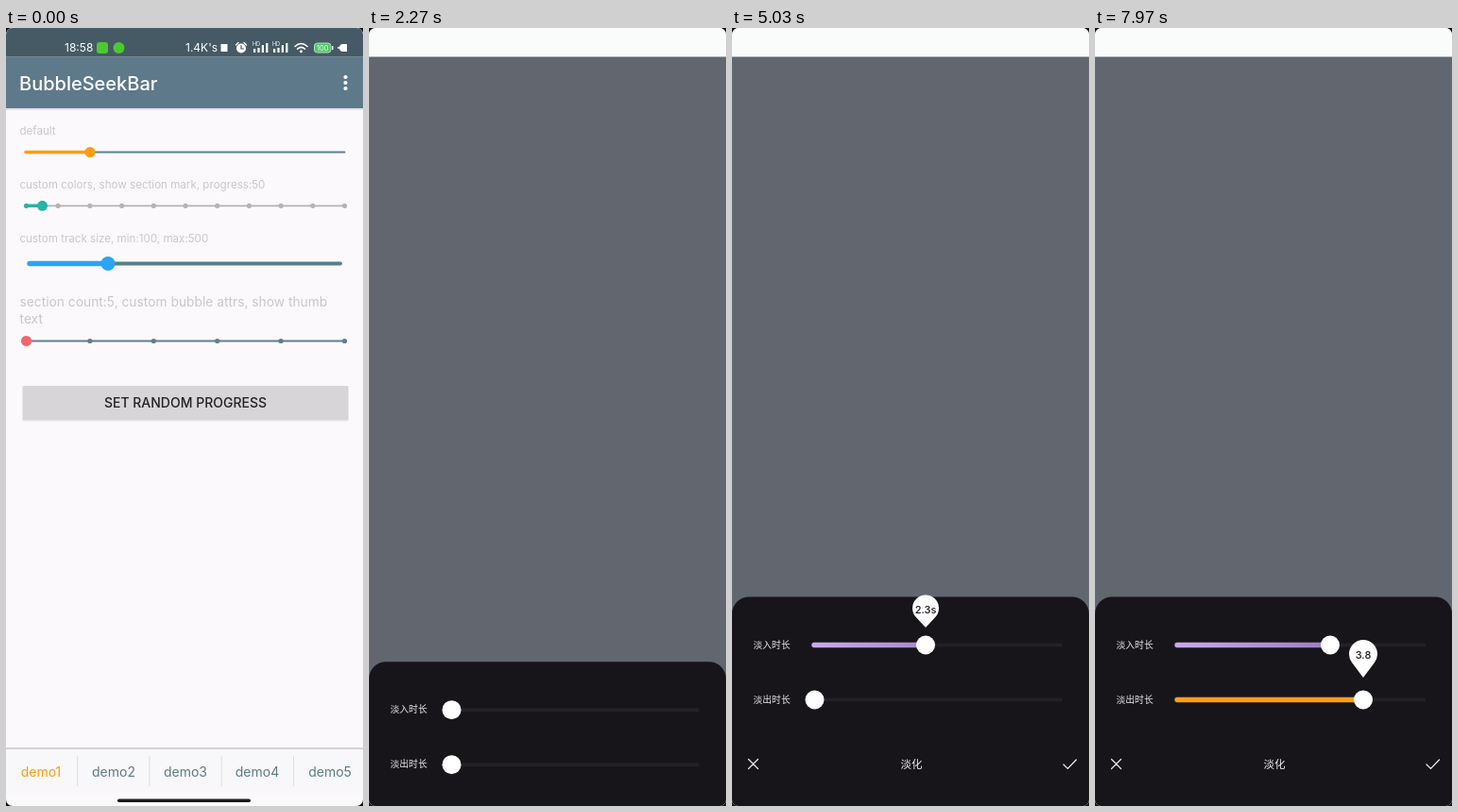
Write an HTML page that moves like this. It is 378 px wide and 824 px high and loops after 8 s.

```html
<!DOCTYPE html>
<html lang="en">
<head>
<meta charset="utf-8">
<title>Seek bar demo</title>
<style>
  html, body { margin: 0; width: 100%; height: 100%; overflow: hidden; background: #111; }
  svg { display: block; width: 100vw; height: 100vh; font-family: Inter, "Noto Sans CJK SC", "Noto Sans CJK", sans-serif; }
  .mid { text-anchor: middle; }
  .note { fill: #c9c7cb; font-size: 11.6px; }
  .line { fill: none; stroke-linecap: round; }
</style>
</head>
<body>
<svg viewBox="0 0 378 824">
  <defs>
    <clipPath id="screen"><rect width="378" height="824" rx="7"/></clipPath>
    <linearGradient id="purple" gradientUnits="userSpaceOnUse" x1="85" x2="250" y1="0" y2="0">
      <stop stop-color="#c9a9f2"/><stop offset="1" stop-color="#9a7dc4"/>
    </linearGradient>
  </defs>
  <g clip-path="url(#screen)">
    <rect width="378" height="824" fill="#fbf9fc"/>

    <g id="page">
      <rect y="85" width="378" height="2" fill="#e4e2e6"/>
      <rect y="30" width="378" height="55" fill="#5d798a"/>
      <text x="14" y="65.5" font-size="20" font-weight="500" fill="#fff">BubbleSeekBar</text>
      <g fill="#fff"><circle cx="359.5" cy="52" r="2.1"/><circle cx="359.5" cy="58" r="2.1"/><circle cx="359.5" cy="64" r="2.1"/></g>
      <g class="note">
        <text x="14.5" y="113">default</text>
        <text x="14.5" y="170">custom colors, show section mark, progress:50</text>
        <text x="14.5" y="227">custom track size, min:100, max:500</text>
        <g font-size="13.8"><text x="14.5" y="294.5">section count:5, custom bubble attrs, show thumb</text><text x="14.5" y="313">text</text></g>
      </g>
      <g id="bars"></g>
      <rect x="17" y="379" width="346" height="37.5" rx="2" fill="#e6e4e7"/>
      <rect x="18" y="379" width="344" height="36" rx="1.5" fill="#d7d5d8"/>
      <text class="mid" x="190" y="402" font-size="14" font-weight="500" fill="#222">SET RANDOM PROGRESS</text>
    </g>

    <g id="tabs">
      <rect y="762" width="378" height="48" fill="#f8f7fa"/>
      <rect y="762" width="378" height="2" fill="#d4d3d6"/>
      <circle id="ripple" cx="37" cy="788" fill="#ff9800"/>
    </g>
    <rect id="pill" x="118" y="816.5" width="141" height="3.5" rx="1.75" fill="#1b1a1c"/>

    <rect id="veil" y="30" width="378" height="794" fill="#62666f"/>

    <rect width="378" height="30.5" fill="#fafcfb"/>
    <g id="status" fill="#fff">
      <rect width="378" height="30.5" fill="#455a65"/>
      <g font-size="12"><text x="62" y="25">18:58</text><text x="190" y="25">1.4K's</text></g>
      <rect x="96" y="15" width="12" height="12" rx="3" fill="#4cc930"/>
      <circle cx="119.500" cy="21" r="6" fill="#4cc930"/>
      <rect x="227.500" y="17" width="7" height="8"/>
      <circle cx="249" cy="21.5" r="5"/>
      <path class="line" d="M249 18.500V22H251.500" stroke="#455a65" stroke-width="1.2"/>
      <path class="line" d="M243.500 18L246 15.500M252 15.500L254.500 18" stroke="#fff" stroke-width="1.3"/>
      <g id="signals"></g>
      <path class="line" d="M306 19.500Q312.500 13.500 319 19.500M308.500 22.300Q312.500 18.500 316.500 22.300" stroke="#fff" stroke-width="1.5"/>
      <circle cx="312.500" cy="24.700" r="1.500"/>
      <rect x="326.500" y="16" width="17.500" height="10" rx="3" fill="#4cc964" stroke="#b8d9c0"/>
      <rect x="345" y="19" width="1.500" height="4"/>
      <text class="mid" x="335.300" y="24" font-size="7.500">100</text>
      <path d="M361 17V25H357Q353 25 353 21T357 17ZM351 20.300H354V21.700H351Z"/>
    </g>

    <g id="sheet">
      <rect y="602.5" width="378" height="260" rx="18" fill="#17151a"/>
      <g fill="#e9e8ea" font-size="9.8"><text x="22.5" y="656.5">淡入时长</text><text x="22.5" y="714.5">淡出时长</text></g>
      <text class="mid" x="190" y="784" font-size="11.5" fill="#eee">淡化</text>
      <path class="line" d="M17.500 774.500L27.500 784.500M27.500 774.500L17.500 784.500M351 780L355.500 784.500L364.500 775" stroke="#eee" stroke-width="1.2"/>
    </g>
  </g>
</svg>
<script>
const $ = id => document.getElementById(id);
const LOOP = 8000, LAUNCH = 1950;

function add(parent, tag, attrs, text) {
  const el = document.createElementNS('http://www.w3.org/2000/svg', tag);
  set(el, attrs);
  if (text) el.textContent = text;
  return parent.appendChild(el);
}
function set(el, attrs) {
  for (const k in attrs) el.setAttribute(k, attrs[k]);
}
const line = (parent, x1, x2, y, stroke, width) =>
  add(parent, 'path', { class: 'line', d: `M${x1} ${y}H${x2}`, stroke, 'stroke-width': width });
const dot = (parent, cx, cy, r, fill) => add(parent, 'circle', { cx, cy, r, fill });

// Static seek bars of the first page
function bar(y, x1, x2, thumb, track, color, width, r, sections = 0) {
  const g = $('bars');
  line(g, x1, x2, y, track, width);
  for (let i = 0; i <= sections && sections; i++) {
    const x = x1 + (x2 - x1) * i / sections;
    dot(g, x, y, 2.6, x <= thumb ? color : track);
  }
  if (thumb > x1) line(g, x1, thumb, y, color, width + 1.6);
  dot(g, thumb, y, r, color);
}
bar(131.5, 21, 358.5, 89, '#5a828d', '#fb9d12', 2, 5.5);
bar(188.3, 21.5, 358.5, 38.5, '#b3b2b5', '#27b3a6', 1.8, 5.5, 10);
bar(249.5, 25, 354, 108, '#55808b', '#2ba5f3', 3.8, 7.6);
bar(331.5, 21.5, 358.5, 21.5, '#5f7f8d', '#f1656d', 1.8, 5.5, 5);

[37, 114, 190, 266, 343].forEach((x, i) => {
  if (i) add($('tabs'), 'rect', { x: 76.3 * i - 1.2, y: 771, width: 1, height: 32, fill: '#dddce0' });
  add($('tabs'), 'text', { class: 'mid', x, y: 793, 'font-size': 14, fill: i ? '#5d7b88' : '#fb9d12' }, 'demo' + (i + 1));
});

for (const x of [261, 282]) {
  add($('signals'), 'text', { x, y: 19, 'font-size': 5.5 }, 'HD');
  for (let i = 0; i < 4; i++) {
    const height = [4, 5, 8, 10][i];
    add($('signals'), 'rect', { x: x + 1 + i * 4.4, y: 26 - height, width: 2.2, height });
  }
}

// Draggable slider with a drop-shaped bubble
function slider(y, color, r, lift, tip, unit, keys, hide) {
  const g = $('sheet');
  line(g, 87, 348, y, '#232125', 4);
  const fill = line(g, 87, 87, y, color, 5.4);
  const thumb = dot(g, 87.5, y, 10, '#fff');
  const ty = r * r / tip, tx = Math.sqrt(r * r - ty * ty);
  const bubble = add(g, 'g', {});
  add(bubble, 'path', { d: `M0 ${tip}L${-tx} ${ty}A${r} ${r} 0 1 1 ${tx} ${ty}Z`, fill: '#fff' });
  const label = add(bubble, 'text', { class: 'mid', y: 5, 'font-size': 11, 'font-weight': 500, fill: '#17151a' });
  return t => {
    const x = track(t, keys), show = Math.min(ramp(t, keys[0][0], 150), 1 - ramp(t, hide, 150));
    fill.setAttribute('d', `M87 ${y}H${x}`);
    thumb.setAttribute('cx', x);
    label.textContent = ((x - 87) / 52.4).toFixed(1) + unit;
    set(bubble, {
      transform: `translate(${x} ${y - lift + tip * (1 - show)}) scale(${show})`,
      opacity: show
    });
  };
}
const ramp = (t, start, length) => Math.max(0, Math.min(1, (t - start) / length));
function track(t, keys) {
  let x = keys[0][1];
  for (let i = 1; i < keys.length; i++) {
    const [t0, x0] = keys[i - 1], [t1, x1] = keys[i];
    x += (x1 - x0) * ramp(t, t0, t1 - t0);
  }
  return x;
}

const sliders = [
  slider(653.5, 'url(#purple)', 14, 39, 20.5, 's', [[2950, 87.5], [3630, 138], [5030, 205], [6050, 249]], 6350),
  slider(711.5, '#ff9d15', 15, 48.5, 25, '', [[6700, 87.5], [7970, 284]], 9000)
];

function draw(t) {
  const launched = t >= LAUNCH;
  $('status').setAttribute('visibility', launched ? 'hidden' : 'visible');
  $('pill').setAttribute('visibility', launched ? 'hidden' : 'visible');
  $('tabs').setAttribute('transform', `translate(0 ${launched ? 15 : 0})`);
  set($('ripple'), { r: 21 * ramp(t, 1720, 200), opacity: 0.16 * ramp(t, 1700, 80) });
  $('veil').setAttribute('opacity', ramp(t, LAUNCH, 300));
  const rise = 1 - ramp(t, 2170, 310);
  $('sheet').setAttribute('transform', `translate(0 ${224 * rise ** 3})`);
  sliders.forEach(update => update(t));
}
function frame() {
  draw(performance.now() % LOOP);
  requestAnimationFrame(frame);
}
frame();
</script>
</body>
</html>
```
